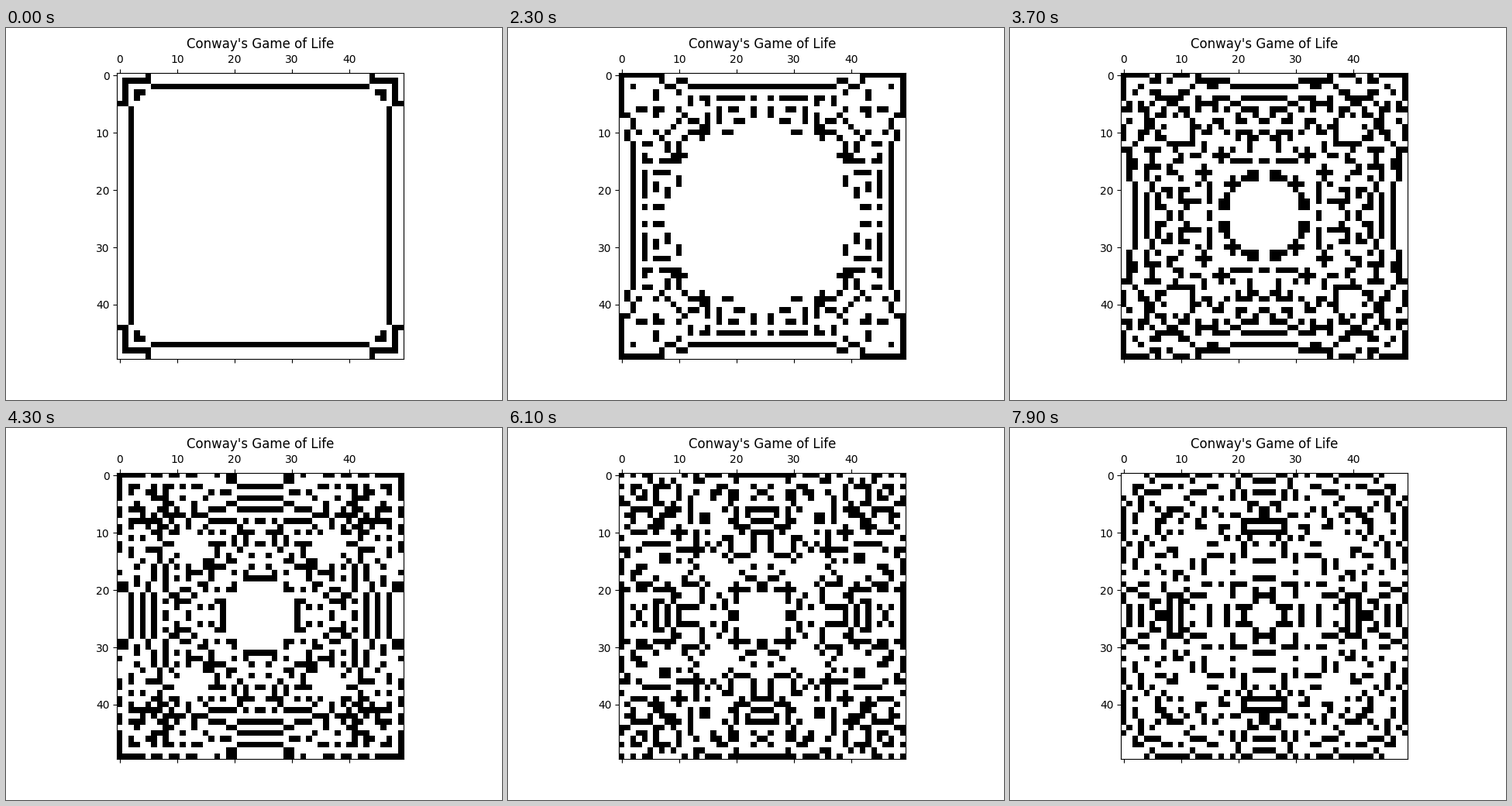
A matplotlib script for the animation above (8000 ms loop, 640 by 480 pixels).

```python
import matplotlib.pyplot as plt
import numpy as np
from matplotlib.animation import FuncAnimation

SIZE = 50
FRAMES = 80
INTERVAL = 100  # ms
WARM_UP = 4     # generations run before the first picture


def seed_grid():
    """Two full rows and two full columns, each two cells in from the edge."""
    grid = np.zeros((SIZE, SIZE), dtype=int)
    grid[[2, -3], :] = 1
    grid[:, [2, -3]] = 1
    return grid


def count_neighbours(grid):
    """Sum of the eight surrounding cells; everything off the board is dead."""
    p = np.pad(grid, 1)
    block = sum(p[r:r + SIZE, c:c + SIZE] for r in range(3) for c in range(3))
    return block - grid


def step(grid):
    """Birth on 2 neighbours, survival on 2 or 3."""
    n = count_neighbours(grid)
    return ((n == 2) | ((n == 3) & (grid == 1))).astype(int)


def build_history():
    grid = seed_grid()
    for _ in range(WARM_UP):
        grid = step(grid)
    history = [grid]
    while len(history) < FRAMES:
        history.append(step(history[-1]))
    return history


history = build_history()

fig, ax = plt.subplots(figsize=(6.4, 4.8), dpi=100)
image = ax.matshow(history[0], cmap="binary", vmin=0, vmax=1)
ax.set_title("Conway's Game of Life")


def update(i):
    image.set_data(history[i])
    return [image]


anim = FuncAnimation(fig, update, frames=FRAMES, interval=INTERVAL,
                     repeat=True, repeat_delay=0)
plt.show()
```
